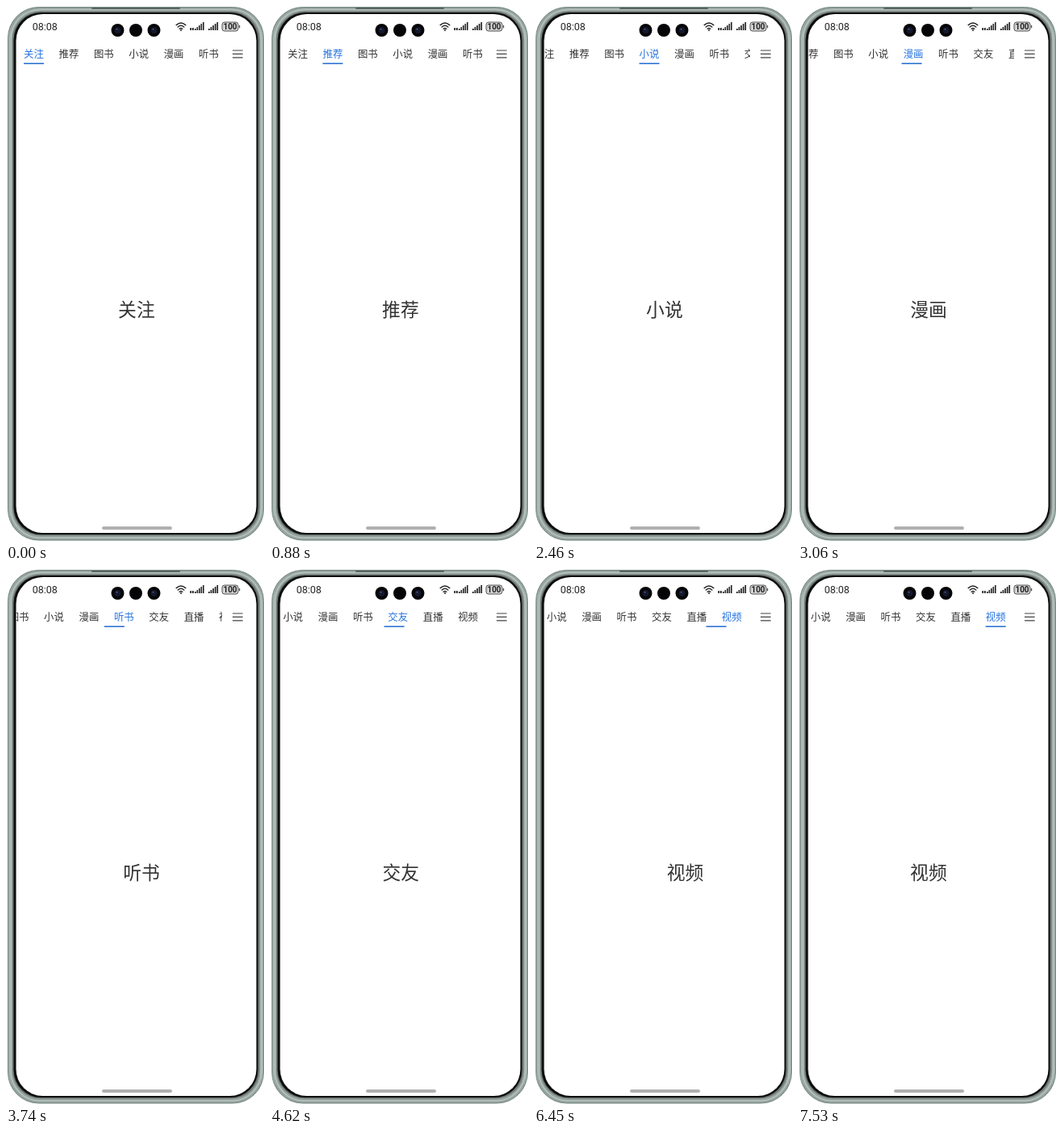
These frames come from a looping animation (320 by 662 pixels, 7690 ms). An HTML page:

```html
<!DOCTYPE html>
<html lang="zh-CN">
<head>
<meta charset="utf-8">
<title>Tabs</title>
<style>
  html, body { margin: 0; width: 100%; height: 100%; overflow: hidden; background: #fff; }
  svg { display: block; width: 320px; height: 662px; }
  text { font-family: "Noto Sans CJK SC", "Noto Sans CJK", sans-serif; text-anchor: middle; fill: #333; }
  #tabs text { font-size: 12.4px; }
  #pages text { font-size: 22.8px; }
  #status text { font-family: Roboto, sans-serif; fill: #222; }
  #tabs text.on { fill: #2673de; }
</style>
</head>
<body>
<svg viewBox="0 0 320 662">
  <defs>
    <linearGradient id="metal">
      <stop offset="0" stop-color="#a9b8b2"/>
      <stop offset=".015" stop-color="#96a39e"/>
      <stop offset=".985" stop-color="#96a39e"/>
      <stop offset="1" stop-color="#a9b8b2"/>
    </linearGradient>
    <clipPath id="screen"><rect x="12.5" y="10" width="298" height="642" rx="33"/></clipPath>
    <clipPath id="bar"><rect x="10.5" y="45" width="257.5" height="32"/></clipPath>
  </defs>

  <!-- phone body -->
  <rect x="2.5" y="1.5" width="317" height="659.5" rx="38" fill="url(#metal)" stroke="#6f837c"/>
  <rect x="6" y="4.5" width="310.5" height="653.5" rx="36" fill="none" stroke="#b9c4c0" stroke-width="1.5"/>
  <rect x="8" y="6.5" width="306.5" height="649" rx="35" fill="#6d7673"/>
  <rect x="9.5" y="8" width="303" height="646" rx="34" fill="#0c0d0d"/>
  <rect x="106" y="2" width="110" height="2" rx="1" fill="#596661"/>
  <rect x="12.5" y="10" width="298" height="642" rx="33" fill="#fff"/>

  <g clip-path="url(#screen)">
    <g id="pages"></g>
    <g clip-path="url(#bar)">
      <g id="tabs"><rect id="line" y="70.4" width="25" height="1.6" fill="#2f74d4"/></g>
    </g>
  </g>
  <circle id="touch" r="8" fill="#fff" fill-opacity=".55" stroke="#bdb6b6" stroke-width=".9"/>

  <g id="status">
    <text x="48.3" y="30" font-size="12.5">08:08</text>
    <g fill="none" stroke="#222" stroke-width="1.4" stroke-linecap="round">
      <path d="M211.2 23.6Q217 18.6 222.8 23.6M213.2 26Q217 22.7 220.8 26M215.2 28.2Q217 26.7 218.8 28.2"/>
    </g>
    <circle cx="217" cy="30" r="1" fill="#222"/>
    <g id="bars" fill="#222"></g>
    <rect x="268" y="20" width="20" height="11" rx="3" fill="#d2d2d2" stroke="#555" stroke-width="1"/>
    <path d="M289.6 23.8v3.4" stroke="#555" stroke-width="1.3"/>
    <text x="278" y="29.2" font-size="10" font-weight="700">100</text>
  </g>
  <g id="lenses"></g>
  <path d="M281 55h12.7M281 59.4h12.7M281 63.8h12.7" stroke="#444" stroke-width="1.2"/>
  <rect x="119" y="644" width="87" height="4" rx="2" fill="#b0b0b0"/>
</svg>
<script>
const LOOP = 7690, MOVE = 360, PRESS = 80;
const PITCH = 43.4, FIRST = 34.5, MAX_SCROLL = 136.5, PAGE = 298;
const names = ["关注", "推荐", "图书", "小说", "漫画", "听书", "交友", "直播", "视频"];
const starts = [160, 1250, 2060, 2718, 3480, 4300, 5310, 6250];

const $ = id => document.getElementById(id);
function add(parent, tag, attrs, text) {
  const el = document.createElementNS("http://www.w3.org/2000/svg", tag);
  for (const k in attrs) el.setAttribute(k, attrs[k]);
  if (text) el.textContent = text;
  return parent.appendChild(el);
}

const tabX = i => FIRST + PITCH * i;
const scrollFor = i => Math.min(MAX_SCROLL, Math.max(0, tabX(i) - 143));
const mix = (a, b, u) => a + (b - a) * u;

const tabs = names.map((n, i) => add($("tabs"), "text", { x: tabX(i), y: 63.8 }, n));
names.forEach((n, i) => add($("pages"), "text", { x: 161.9 + PAGE * i, y: 383.5 }, n));

// signal strength
for (let i = 0; i < 5; i++) {
  const h = 2 + i * 2;
  add($("bars"), "rect", { x: 234 + i * 2.5, y: 30 - h, width: 1.6, height: h });
  add($("bars"), "rect", { x: 251 + i * 2.6, y: 30 - h, width: 1.7, height: h });
}
for (const x of [228.3, 231]) add($("bars"), "rect", { x, y: 27, width: 1.8, height: 3 });

// camera lenses
[138.5, 161, 183.5].forEach((cx, i) => {
  add($("lenses"), "circle", { cx, cy: 30, r: 8, fill: "#050507" });
  if (i === 1) return;
  add($("lenses"), "circle", { cx, cy: 30, r: 4, fill: "#14182c" });
  add($("lenses"), "circle", { cx: cx - 1, cy: 28.8, r: 1, fill: "#4b5687" });
});

function draw(t) {
  const now = starts.filter(s => t >= s).length;
  const old = Math.max(0, now - 1);
  const u = now ? Math.min(1, (t - starts[old]) / MOVE) : 1;
  const page = mix(old, now, 1 - (1 - u) ** 3);
  const scroll = mix(scrollFor(old), scrollFor(now), 1 - (1 - u) ** 2);

  $("pages").setAttribute("transform", `translate(${-PAGE * page} 0)`);
  $("tabs").setAttribute("transform", `translate(${-scroll} 0)`);
  $("line").setAttribute("x", tabX(mix(old, now, u)) - 12.5);
  tabs.forEach((el, i) => el.setAttribute("class", i === now ? "on" : ""));

  const pressed = now < starts.length && t >= starts[now] - PRESS;
  $("touch").setAttribute("visibility", pressed ? "visible" : "hidden");
  $("touch").setAttribute("cx", tabX(now + 1) - scroll + 6.3);
  $("touch").setAttribute("cy", 58);
}

const begin = performance.now();
function tick() {
  draw((performance.now() - begin) % LOOP);
  requestAnimationFrame(tick);
}
tick();
</script>
</body>
</html>
```
